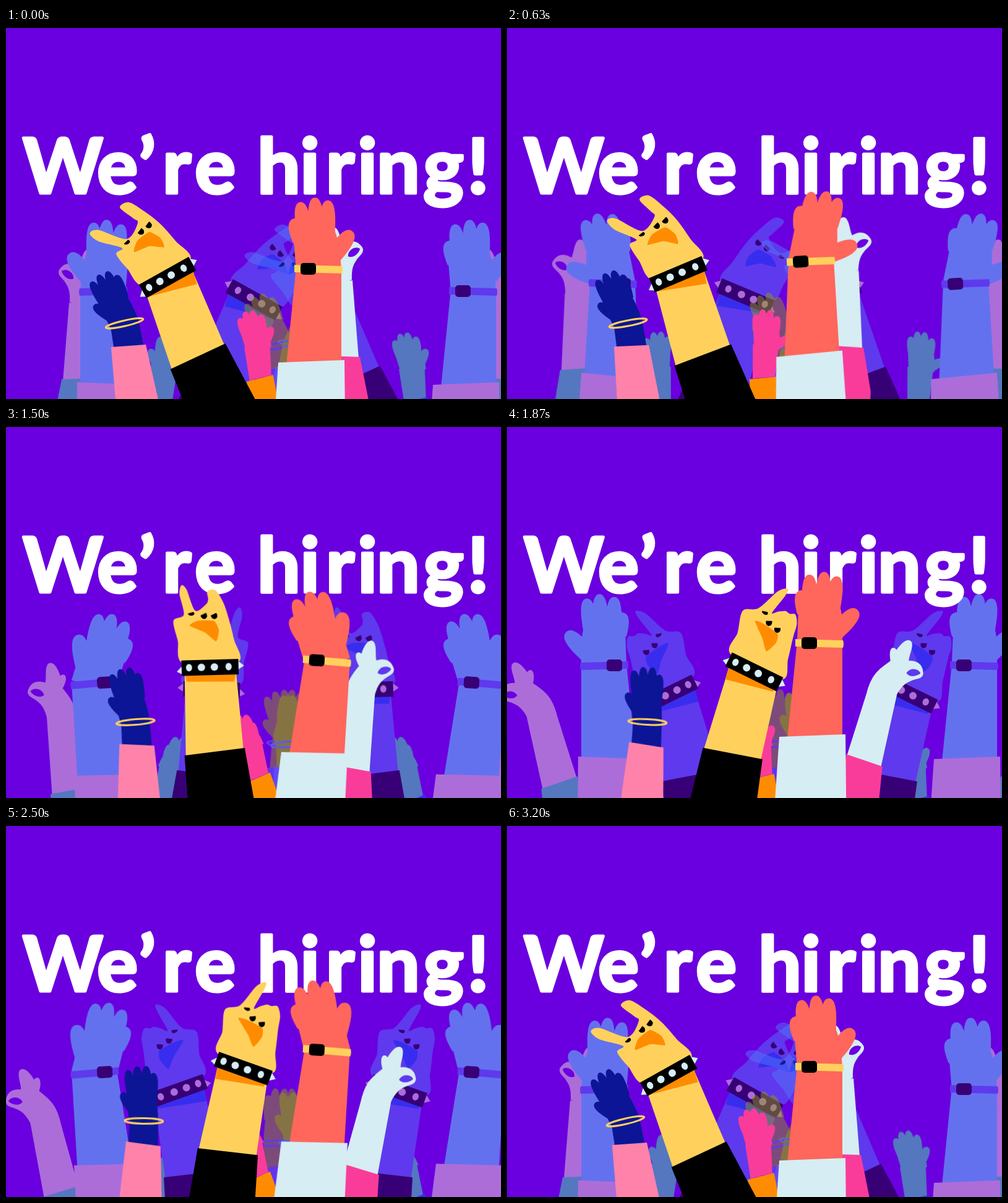
An HTML page for the animation above (3230 ms loop, 800 by 600 pixels).

```html
<!DOCTYPE html>
<html lang="en">
<head>
<meta charset="utf-8">
<title>We’re hiring!</title>
<style>
  html, body { margin: 0; width: 100%; height: 100%; overflow: hidden; background: #6a00df; }
  svg { display: block; width: 100vw; height: 100vh; }
  text { font: 700 123px Lato, "Open Sans", sans-serif; fill: #fff; stroke: #fff;
    stroke-width: 5; stroke-linejoin: round; text-anchor: middle; }

  .front { --coral: #ff665c; --pale: #d6edf3; --yellow: #ffd15c; --orange: #ff8c00;
    --pink: #f93c9a; --rose: #ff82ab; --navy: #0c1596; --black: #000; }
  .ghost { --coral: #5ef3ff; --pale: #f9ead3; --yellow: #557bfd; --orange: #0062ff;
    --pink: #3cff9d; --rose: #5d6cff; --navy: #93a008; --black: #000; opacity: .47; }

  .coral { fill: var(--coral); }
  .pale { fill: var(--pale); }
  .yellow { fill: var(--yellow); }
  .orange { fill: var(--orange); }
  .pink { fill: var(--pink); }
  .rose { fill: var(--rose); }
  .navy { fill: var(--navy); }
  .black { fill: var(--black); }
  .ring { fill: none; stroke: var(--yellow); stroke-width: 3; }
</style>
</head>
<body>
<svg viewBox="0 0 800 600">
  <defs>
    <g id="crowd">
      <g id="smallArm">
        <path class="orange" d="M-23 -22L21 -26L24 70H-22Z"/>
        <path class="pink" d="M-18 -23L18 -26L24 -78H-18Z"/>
        <g id="smallHand" class="pink"></g>
      </g>

      <g id="okArm">
        <path class="pale" d="M-29 2L-28 -116L19 -124L29 2Z"/>
        <path class="pink" d="M-31 -2L31 0L45 70V130H-20L-18 68Z"/>
        <g id="okHand">
          <path class="pale" fill-rule="evenodd" d="M-28 -108C-29 -135 -22 -148 -6 -167
            C-16 -185 -10 -193 -2 -187C2 -200 10 -213 18 -206C23 -199 20 -186 22 -176
            C34 -180 45 -178 50 -164C53 -154 42 -152 35 -146C26 -139 23 -132 19 -118Z
            M24 -156C30 -150 42 -155 46 -162C42 -168 28 -168 24 -156Z"/>
        </g>
      </g>

      <g id="hornArm">
        <path class="yellow" d="M-41 -232H41L47 -80H-47Z"/>
        <path class="black" transform="rotate(-4 0 -89)" d="M-49 -89H49L57 60H-57Z"/>
        <g id="hornHand">
          <path class="orange" id="cuff"/>
          <path class="yellow" id="fist"/>
          <path class="orange" id="mouth"/>
          <g id="eyes" class="black"></g>
          <path class="pale" d="M44 -10L55 -1L44 6ZM-44 -4L-54 6L-44 11Z"/>
          <path class="black" d="M-46 -12H46V13H-46Z"/>
          <g id="studs" class="pale"></g>
        </g>
      </g>

      <g id="navyArm">
        <path class="navy" d="M-24 2L-23 -42H23L24 3Z"/>
        <path class="rose" d="M-28 -3L28 3L34 130H-40Z"/>
        <g id="navyHand" class="navy"></g>
        <ellipse id="bangle" class="ring" cx="0" cy="-37" rx="31" ry="4.5"/>
      </g>

      <g id="waveArm">
        <path class="coral" d="M469 386L542 388L542 542L453 545Z"/>
        <path class="pale" d="M440 541L547 537L549 720L428 720Z"/>
        <g id="waveHand" class="coral"></g>
        <path class="yellow" d="M466 383L543 385Q545 391 543 397L466 395Z"/>
        <rect class="black" x="476" y="380" width="25" height="19" rx="5"/>
      </g>
    </g>
  </defs>

  <rect width="800" height="600" fill="#6a00df"/>
  <use class="ghost" href="#crowd" transform="translate(662 36) scale(-1 1)"/>
  <use class="ghost" href="#crowd" transform="translate(250 36)"/>
  <text y="266.5" x="92 180 228 276 338 390 441 491 540 584 634 707 763">We’re hiring!</text>
  <use class="front" href="#crowd"/>
</svg>

<script>
const $ = id => document.getElementById(id);
const place = (id, value) => $(id).setAttribute('transform', value);
const shape = (id, d) => $(id).setAttribute('d', d);
const mix = (a, b, k) => a + (b - a) * k;

// Tapered finger from a base point to a rounded tip.
function finger(x0, y0, x1, y1, w) {
  const len = Math.hypot(x1 - x0, y1 - y0);
  const nx = (y0 - y1) / len * w / 2, ny = (x1 - x0) / len * w / 2;
  const mx = mix(x0, x1, .65), my = mix(y0, y1, .65);
  return `M${x0 + nx} ${y0 + ny}C${mx + nx * 1.25} ${my + ny * 1.25} ${x1 + nx} ${y1 + ny} ${x1} ${y1}` +
    `C${x1 - nx} ${y1 - ny} ${mx - nx * 1.25} ${my - ny * 1.25} ${x0 - nx} ${y0 - ny}Z`;
}

// Open hand: palm, four fingers and a thumb that can turn by itself.
function openHand(id, palm, tips, baseY, w, thumb) {
  const fingers = tips.map(([x, y]) => finger(x * .78, baseY, x, y, w)).join('');
  $(id).innerHTML = `<path d="${palm}"/><path d="${fingers}"/>` +
    `<path id="${id}Thumb" d="${finger(...thumb)}"/>`;
}

openHand('waveHand', 'M-36 6L-37 -40Q-38 -62 -33 -70L24 -76Q33 -55 36 -32L37 6Z',
  [[-35, -83], [-23, -109], [1, -115], [22, -109]], -46, 23, [24, -16, 58, -57, 25]);
openHand('navyHand', 'M-23 4Q-26 -30 -20 -48L21 -52Q25 -30 23 4Z',
  [[-19, -84], [-4, -89], [11, -88], [22, -76]], -36, 15, [-14, -16, -32, -48, 16]);
openHand('smallHand', 'M-18 6L-19 -22L-16 -34L20 -32Q26 -18 23 6Z',
  [[-15, -52], [-4, -60], [8, -59], [20, -49]], -20, 13, [14, -2, 32, -25, 14]);

// Horned fist in wrist coordinates: leaning left, leaning right.
const fistLeft = [[-39, -6], [-50, -44], [-54, -73], [-41, -77], [-69, -105], [-75, -123], [-60, -121],
  [-27, -86], [1, -100], [-2, -111], [-12, -136], [5, -136], [20, -110], [32, -81], [40, -45], [45, -6]];
const fistRight = [[-46, -8], [-52, -45], [-60, -80], [-39, -95], [-23, -133], [-10, -144], [-9, -132],
  [-16, -98], [-8, -104], [2, -110], [10, -109], [19, -112], [28, -99], [32, -77], [40, -42], [45, -8]];
const mouthLeft = [[-27, -62], [-14, -75], [10, -78], [21, -61], [19, -45], [-1, -58]];
const mouthRight = [[-35, -74], [-22, -76], [7, -71], [11, -57], [3, -38], [-12, -54]];
const eyesLeft = [[-30, -81], [-2, -85], [14, -88]];
const eyesRight = [[-27, -93], [-14, -81], [3, -77]];

const blend = (a, b, k) => a.map(([x, y], i) => [mix(x, b[i][0], k), mix(y, b[i][1], k)]);

// Closed smooth curve through all points.
function smooth(pts, tension) {
  const n = pts.length, at = i => pts[(i + n) % n];
  let d = 'M' + pts[0];
  for (let i = 0; i < n; i++) {
    const [a, b, c, e] = [at(i - 1), at(i), at(i + 1), at(i + 2)];
    const p = [0, 1].map(j => b[j] + (c[j] - a[j]) * tension);
    const q = [0, 1].map(j => c[j] - (e[j] - b[j]) * tension);
    d += `C${p} ${q} ${c}`;
  }
  return d + 'Z';
}

$('eyes').innerHTML = [.6, 1, 1].map(h =>
  `<g><path transform="scale(1 ${h})" d="M-5 -1L4 -5Q8 2 2 5Q-4 5 -5 -1Z"/></g>`).join('');
$('studs').innerHTML = [-34, -14, 7, 30].map((x, i) =>
  `<ellipse cx="${x}" cy="0" rx="${i % 3 ? 6 : 5}" ry="6"/>`).join('');

function drawHorns(q) {
  const raw = Math.min(1, Math.max(0, (q + .92) / 1.84));
  const k = raw * raw * (3 - 2 * raw);
  place('hornArm', `translate(342 614) rotate(${-3.1 + 19.4 * q})`);
  place('hornHand', `translate(0 -226) rotate(${1.5 + 10.5 * q})`);
  shape('fist', smooth(blend(fistLeft, fistRight, k), .15));
  shape('mouth', smooth(blend(mouthLeft, mouthRight, k), .09));
  shape('cuff', `M-41 8H42L${mix(36, 41, k)} ${mix(33, 16, k)}L${mix(-40, -37, k)} ${mix(13, 32, k)}Z`);
  blend(eyesLeft, eyesRight, k).forEach(([x, y], i) =>
    $('eyes').children[i].setAttribute('transform', `translate(${x} ${y})`));
}

function draw(frame) {
  const turn = frame * Math.PI / 8;
  const s = Math.sin(turn), c = Math.cos(turn);
  const q = -Math.cos(turn - Math.PI / 8);   // sway, -1 left to 1 right

  place('waveArm', `translate(0 ${-20 * (1 - c)}) rotate(${-3.7 * s} 493 622)`);
  place('waveHand', `translate(505 389) rotate(${19 * s - 3.5 * c})`);
  place('waveHandThumb', `rotate(${16 * s} 10 -18)`);

  drawHorns(q);

  place('okArm', `translate(${559 + 19.5 * q} ${536 - 4 * c - 20 * s}) rotate(${8.5 + 9.2 * q})`);
  place('okHand', `rotate(${-8.5 + 9 * q} -5 -118)`);

  place('navyArm', `translate(${211.5 + 14.7 * q} 514) rotate(${-3.5 + 7 * q})`);
  place('navyHand', `translate(0 -37) rotate(${-10.5 + 6 * q})`);
  place('bangle', `rotate(${-3 * (1 - q) / 2} 0 -37)`);

  place('smallArm', `translate(415 590) rotate(${-9 + 10 * s})`);
  place('smallHand', `translate(2 -75) rotate(${-6 + 6 * s})`);
  place('smallHandThumb', `rotate(${22 * s} 4 -4)`);
}

const loop = 3230, step = 100 / 3, start = performance.now();
let last = -1;
function tick() {
  const t = (performance.now() - start) % loop;
  const frame = Math.floor((t + 3.4) / step);
  if (frame !== last) draw(last = frame);
  requestAnimationFrame(tick);
}
tick();
</script>
</body>
</html>
```
